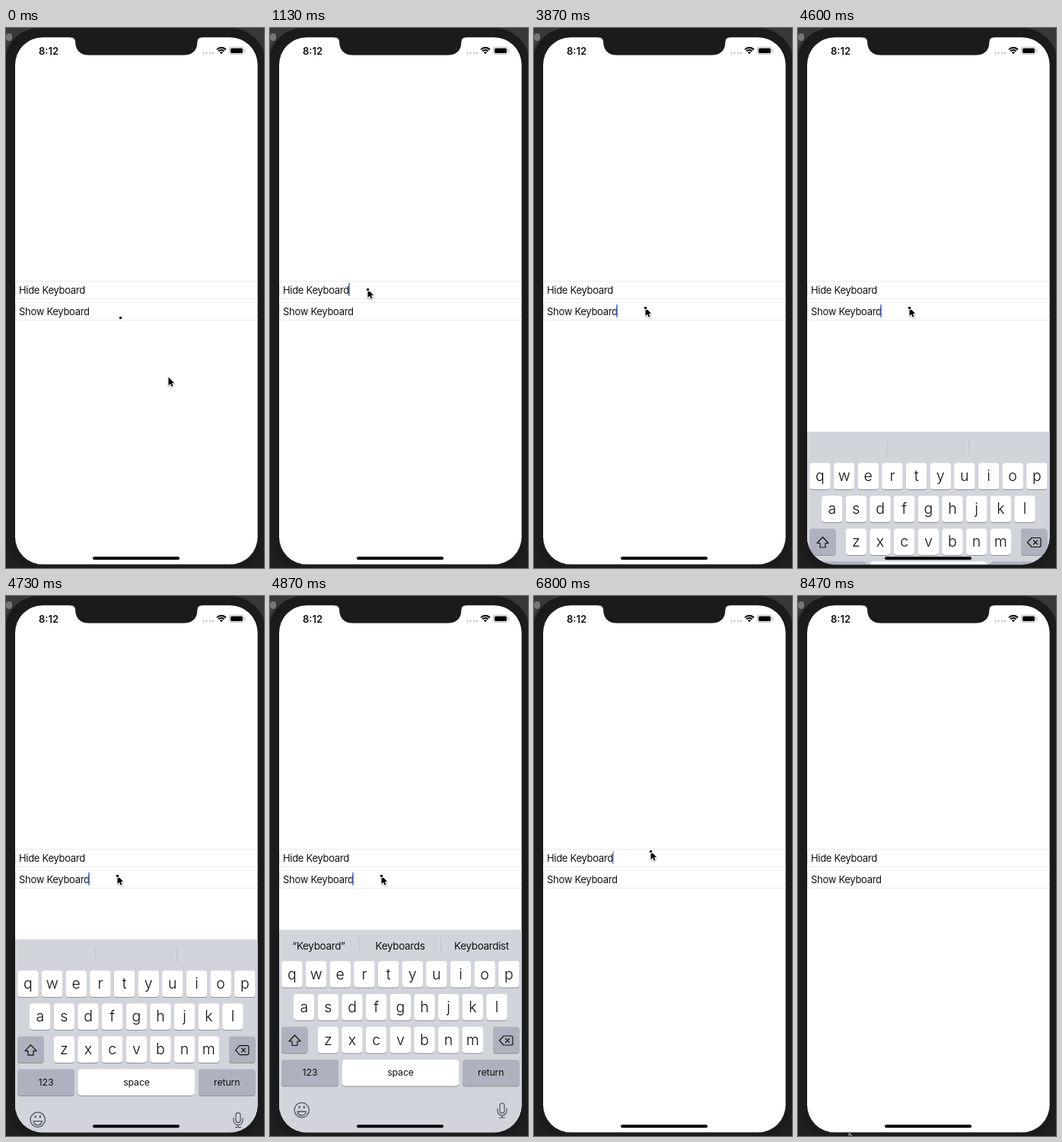
Recreate the animation shown at these times as an HTML page with a canvas. Size 339 by 707 pixels, loop 9270 ms.

```html
<!DOCTYPE html>
<html lang="en">
<head>
<meta charset="utf-8">
<title>Hide and show keyboard</title>
<style>
  html, body { margin: 0; width: 100%; height: 100%; overflow: hidden; background: #1b1b1b; }
  canvas { display: block; }
</style>
</head>
<body>
<canvas id="stage" width="339" height="707"></canvas>
<script>
const ctx = document.getElementById('stage').getContext('2d');
const LOOP = 9270;
const SHOW_AT = 4600, HIDE_AT = 5440;   // keyboard slides in and out
const DOT_LEAD = 100;                   // the dot runs ahead of the arrow on the same path

// Stops of the pointer: arrival time, travel time, x, y.
const STOPS = [
  [100, 100, 150, 379], [330, 230, 149, 331], [730, 300, 150, 301], [1130, 240, 128, 342],
  [3200, 270, 142, 300], [3870, 370, 146, 366], [5270, 310, 157, 252], [5876, 400, 153, 334],
  [7470, 240, 163, 298], [8470, 670, 67, 704]
];

const clamp = u => Math.max(0, Math.min(1, u));
const smooth = u => u * u * (3 - 2 * u);
const easeOut = u => 1 - (1 - clamp(u)) ** 3;

function pointerAt(t) {
  let x = 213, y = 457;
  for (const [arrival, travel, toX, toY] of STOPS) {
    const k = smooth(clamp(1 - (arrival - t) / travel));
    x += (toX - x) * k;
    y += (toY - y) * k;
  }
  return [x, y];
}

// A caret stays on for 0.6 s after a tap, then blinks once a second.
function blink(age) {
  const phase = age % 1000;
  const fadeIn = age < 1000 ? 1 : clamp(phase / 130);
  return Math.min(fadeIn, clamp((730 - phase) / 130));
}

function hideCaret(t) {
  if (t < 3600) {
    const lastTap = t < 730 ? -930 : 730 + 600 * Math.min(2, Math.floor((t - 730) / 600));
    return blink(t - lastTap);
  }
  return t > 6160 && t < 8000 ? blink(t - 6160) : 0;
}

const showCaret = t => (t >= 3700 && t < HIDE_AT ? 1 : 0);

const keyboardOffset = t => t < HIDE_AT
  ? 92.5 * (1 - easeOut((t - SHOW_AT) / 270))
  : 235 * easeOut((t - HIDE_AT) / 580);

function box(x, y, w, h, r, fill) {
  ctx.fillStyle = fill;
  ctx.beginPath();
  ctx.roundRect(x, y, w, h, r);
  ctx.fill();
}

function label(str, x, y, size, { align = 'center', weight = 400, spacing = -0.3 } = {}) {
  ctx.font = `${weight} ${size}px Inter, sans-serif`;
  ctx.letterSpacing = spacing + 'px';
  ctx.textAlign = align;
  ctx.fillStyle = '#111';
  ctx.fillText(str, x, y);
}

function stroke(d, color, width) {
  ctx.strokeStyle = color;
  ctx.lineWidth = width;
  ctx.lineCap = ctx.lineJoin = 'round';
  ctx.stroke(new Path2D(d));
}

function key(x, y, w, fill = '#fff') {
  box(x, y + 1, w, 34.5, 4, '#8f9299');
  box(x, y, w, 34.5, 4, fill);
}

function drawField(str, y, caretX, caretAlpha) {
  ctx.strokeStyle = '#ebebeb';
  ctx.lineWidth = 1;
  ctx.beginPath();
  ctx.roundRect(12.5, y + 0.5, 319, 23, 4);
  ctx.stroke();
  label(str, 17, y + 16.7, 13, { align: 'left' });
  ctx.globalAlpha = caretAlpha;
  box(caretX, y + 3, 1.6, 17, 0.8, '#3f6ad8');
  ctx.globalAlpha = 1;
}

function drawKeyboard(t) {
  const hasBar = t < HIDE_AT;
  const gray = '#adb2be', ink = '#50545c';
  ctx.save();
  ctx.translate(0, keyboardOffset(t));
  box(12, hasBar ? 437 : 472, 319, 280, 0, '#d1d4db');

  if (hasBar) {
    for (const x of [116.5, 224]) box(x, 447, 1, 20, 0, '#bfc2c9');
    if (t >= SHOW_AT + 200) {
      ['“Keyboard”', 'Keyboards', 'Keyboardist'].forEach((word, i) =>
        label(word, 64 + 107 * i, 462.6, 13.4));
    }
  }

  ['qwertyuiop', 'asdfghjkl', 'zxcvbnm'].forEach((letters, row) => {
    const y = 478 + 43 * row;
    const left = 171.2 - 15.8 * letters.length;
    [...letters].forEach((letter, i) => {
      const x = left + 31.65 * i + 2;
      key(x, y, 27.5);
      label(letter, x + 13.75, y + 23.7, 19.5, { spacing: 0, weight: 300 });
    });
  });

  key(15, 564, 34.5, gray);
  stroke('M32.5 575 L40 583 H36 V588.5 H29 V583 H25 Z', '#111', 1.2);
  key(293, 564, 34.5, gray);
  stroke('M301.5 582 L307 576 H317 Q319 576 319 578 V586 Q319 588 317 588 H307 Z M309.5 579.5 L314.5 584.5 M314.5 579.5 L309.5 584.5', '#111', 1.2);

  [['123', 15, 75, gray], ['space', 95, 153, '#fff'], ['return', 253, 74.5, gray]].forEach(([word, x, w, fill]) => {
    key(x, 607, w, fill);
    label(word, x + w / 2, 628.3, 12.3, { spacing: -0.1 });
  });

  stroke('M32 673 a9.7 9.7 0 1 0 19.4 0 a9.7 9.7 0 1 0 -19.4 0 M36 675 H47.4 Q46.5 680 41.7 680 Q37 680 36 675 Z', ink, 1.3);
  for (const x of [37.6, 43.8]) box(x, 667.5, 2, 3.5, 1, ink);
  stroke('M302 667 a3 3 0 0 1 6 0 V674 a3 3 0 0 1 -6 0 Z M299 671 V674 a6 6 0 0 0 12 0 V671 M305 680 V683 M301.5 683 H308.5', ink, 1.2);
  ctx.restore();
}

function drawStatus() {
  ctx.fillStyle = '#1b1b1b';
  ctx.fill(new Path2D('M84 11 V12.3 Q91 12.3 91 18 Q92 35.5 109 35.5 H233 Q251 35.5 251.5 18 Q251.5 12.3 258 12.3 V11 Z'));
  label('8:12', 56, 34.7, 13, { weight: 600, spacing: 0 });
  for (let i = 0; i < 4; i++) box(258.5 + 4 * i, 31.5, 2.6, 2.6, 1.3, '#c4c4c4');

  // Wi-Fi: three arcs with one opening angle, the innermost nearly solid.
  ctx.lineCap = 'butt';
  ctx.strokeStyle = '#000';
  for (const [radius, width] of [[8.2, 1.9], [5.2, 1.9], [1.5, 3]]) {
    ctx.lineWidth = width;
    ctx.beginPath();
    ctx.arc(283, 34, radius, -Math.PI * 0.76, -Math.PI * 0.24);
    ctx.stroke();
  }

  ctx.strokeStyle = '#bbb';
  ctx.lineWidth = 1;
  ctx.beginPath();
  ctx.roundRect(293.5, 25, 19, 9.4, 2.8);
  ctx.stroke();
  box(295, 26.5, 16, 6.4, 1.5, '#000');
  box(313.5, 28, 1.3, 3.4, 0.6, '#bbb');
}

function drawPointer(t) {
  const shape = 'M0.5 0 V11 L3 8.8 L4.8 12.6 L6.5 11.8 L4.8 8 H8 Z';
  ctx.save();
  ctx.translate(...pointerAt(t));
  ctx.shadowColor = 'rgba(0,0,0,.35)';
  ctx.shadowBlur = 2;
  ctx.shadowOffsetY = 1;
  stroke(shape, '#fff', 1.6);
  ctx.shadowColor = 'transparent';
  ctx.fillStyle = '#000';
  ctx.fill(new Path2D(shape));
  ctx.restore();

  const [x, y] = pointerAt(t + DOT_LEAD).map(Math.round);
  if (y > 700) return;
  box(x - 2, y - 2, 5, 5, 0, '#fff');
  box(x - 1, y - 1, 3, 3, 0, '#000');
}

function draw(t) {
  const backdrop = ctx.createLinearGradient(0, 0, 0, 707);
  backdrop.addColorStop(0, '#383836');
  backdrop.addColorStop(1, '#1e1e1e');
  box(0, 0, 339, 707, 0, backdrop);
  box(0, 7, 8, 10, 4, '#777');
  box(-2, 0, 343, 708, 46, '#1b1b1b');

  ctx.save();
  ctx.beginPath();
  ctx.roundRect(12, 12.3, 318.6, 690, 36);
  ctx.clip();
  box(12, 12, 319, 691, 0, '#fff');
  drawField('Hide Keyboard', 331, 103.2, hideCaret(t));
  drawField('Show Keyboard', 359, 108.2, showCaret(t));
  if (t >= SHOW_AT && t < HIDE_AT + 580) drawKeyboard(t);
  box(114, 692.2, 114, 4, 2, '#000');
  ctx.restore();

  drawStatus();
  drawPointer(t);
}

function frame() {
  draw(performance.now() % LOOP);
  requestAnimationFrame(frame);
}
frame();
</script>
</body>
</html>
```
